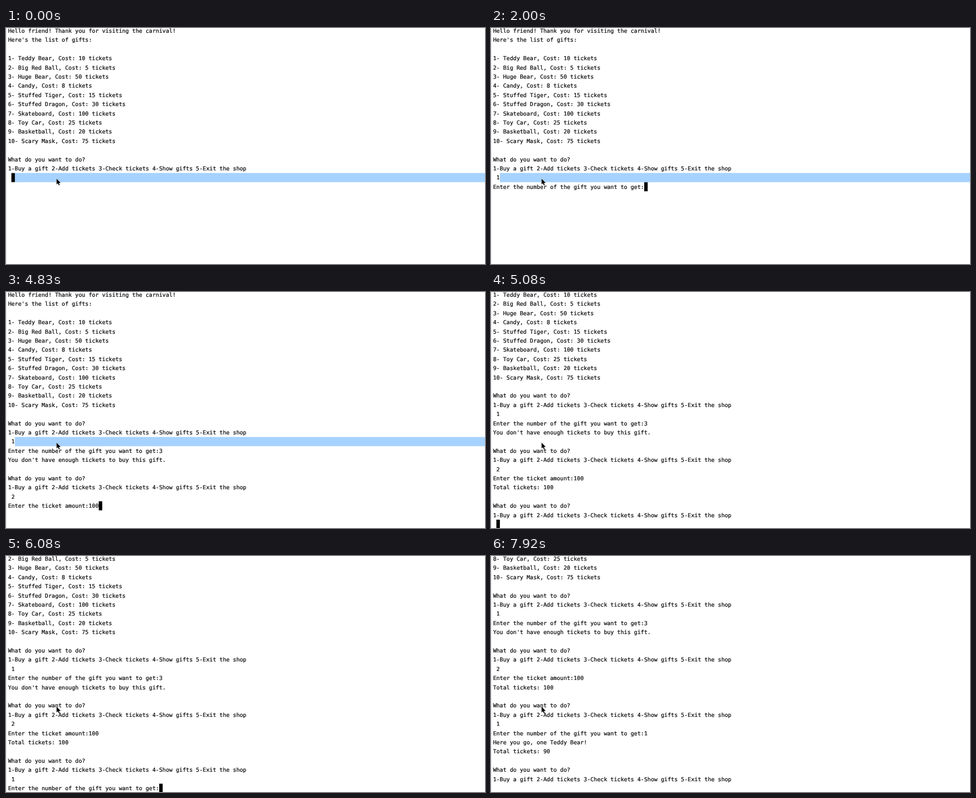
Animation of 800x396 px, one loop 8000 ms. Source, as an HTML page:

```html
<!DOCTYPE html>
<html lang="en">
<head>
<meta charset="utf-8">
<title>Gift shop console</title>
<style>
  html, body { margin: 0; width: 100%; height: 100%; overflow: hidden; background: #fff; }
  svg { display: block; width: 800px; height: 396px; }
  text {
    font: 9.32px "DejaVu Sans Mono", "Noto Sans Mono", monospace;
    font-variant-ligatures: none;
    text-rendering: geometricPrecision;
    white-space: pre;
    fill: #080808;
    stroke: #080808;
    stroke-width: .2px;
  }
</style>
</head>
<body>
<svg viewBox="0 0 800 396">
  <rect width="1" height="396" fill="#e9e9e9"/>
  <rect id="highlight" x="14.8" y="243.3" width="786" height="15.4" fill="#a6d2ff"/>
  <g id="screen"></g>
  <rect id="caret" width="5.8" height="15.2"/>
  <path d="M84.5 252.8v9.8l2.2-2 1.5 3.4 1.6-.7-1.5-3.3h3z"
        stroke="#fff" stroke-width=".8" paint-order="stroke"/>
</svg>
<script>
const LOOP = 8000, ROWS = 26, PITCH = 15.4, CHAR = 5.61, LEFT = 3.4;
const KEY_GAP = 80;

const gifts = {
  "Teddy Bear": 10, "Big Red Ball": 5, "Huge Bear": 50, "Candy": 8,
  "Stuffed Tiger": 15, "Stuffed Dragon": 30, "Skateboard": 100,
  "Toy Car": 25, "Basketball": 20, "Scary Mask": 75
};
const giftList = Object.entries(gifts)
  .map(([name, cost], i) => `${i + 1}- ${name}, Cost: ${cost} tickets\n`).join("");
const menu = "\nWhat do you want to do?\n" +
  "1-Buy a gift 2-Add tickets 3-Check tickets 4-Show gifts 5-Exit the shop\n ";
const askGift = "Enter the number of the gift you want to get:";
const greeting = "Hello friend! Thank you for visiting the carnival!\n" +
  "Here's the list of gifts:\n\n" + giftList + menu;

// Each turn: typing starts, what is typed, Enter is pressed, the reply
const turns = [
  { at: 330, keys: "1", enter: 500, reply: askGift },
  { at: 2170, keys: "3", enter: 2420, reply: "You don't have enough tickets to buy this gift.\n" + menu },
  { at: 3670, keys: "2", enter: 4170, reply: "Enter the ticket amount:" },
  { at: 4670, keys: "100", enter: 5080, reply: "Total tickets: 100\n" + menu },
  { at: 5830, keys: "1", enter: 5920, reply: askGift },
  { at: 7420, keys: "1", enter: 7670, reply: "Here you go, one Teddy Bear!\nTotal tickets: 90\n" + menu }
];
const events = turns.flatMap(({ at, keys, enter, reply }) => [
  ...[...keys].map((text, i) => ({ time: at + i * KEY_GAP, text })),
  { time: enter, text: "\n" + reply }
]);

// The caret stays lit briefly after each event, then blinks
const isLit = age => {
  const phase = age % 840;
  return phase < 240 || phase >= 580;
};

const byId = id => document.getElementById(id);
const screen = byId("screen"), caret = byId("caret"), highlight = byId("highlight");
const rows = Array.from({ length: ROWS }, (_, i) => {
  const row = document.createElementNS("http://www.w3.org/2000/svg", "text");
  row.setAttribute("x", LEFT);
  row.setAttribute("y", i * PITCH + 8);
  return screen.appendChild(row);
});
const setVisible = (el, on) => { el.style.visibility = on ? "visible" : "hidden"; };

let shown;
function showText(text) {
  if (text === shown) return;
  shown = text;
  const lines = text.split("\n");
  const last = lines.length - 1;
  const scroll = Math.max(0, lines.length - ROWS);
  rows.forEach((row, i) => { row.textContent = lines[i + scroll] ?? ""; });
  caret.setAttribute("x", LEFT + lines[last].length * CHAR);
  caret.setAttribute("y", (last - scroll) * PITCH - 3);
  setVisible(highlight, scroll === 0);
}

const start = performance.now();
function tick() {
  const t = (performance.now() - start) % LOOP;
  const past = events.filter(e => e.time <= t);
  const lastTime = past.length ? past.at(-1).time : -160;
  showText(greeting + past.map(e => e.text).join(""));
  setVisible(caret, isLit(t - lastTime));
  requestAnimationFrame(tick);
}
tick();
</script>
</body>
</html>
```
